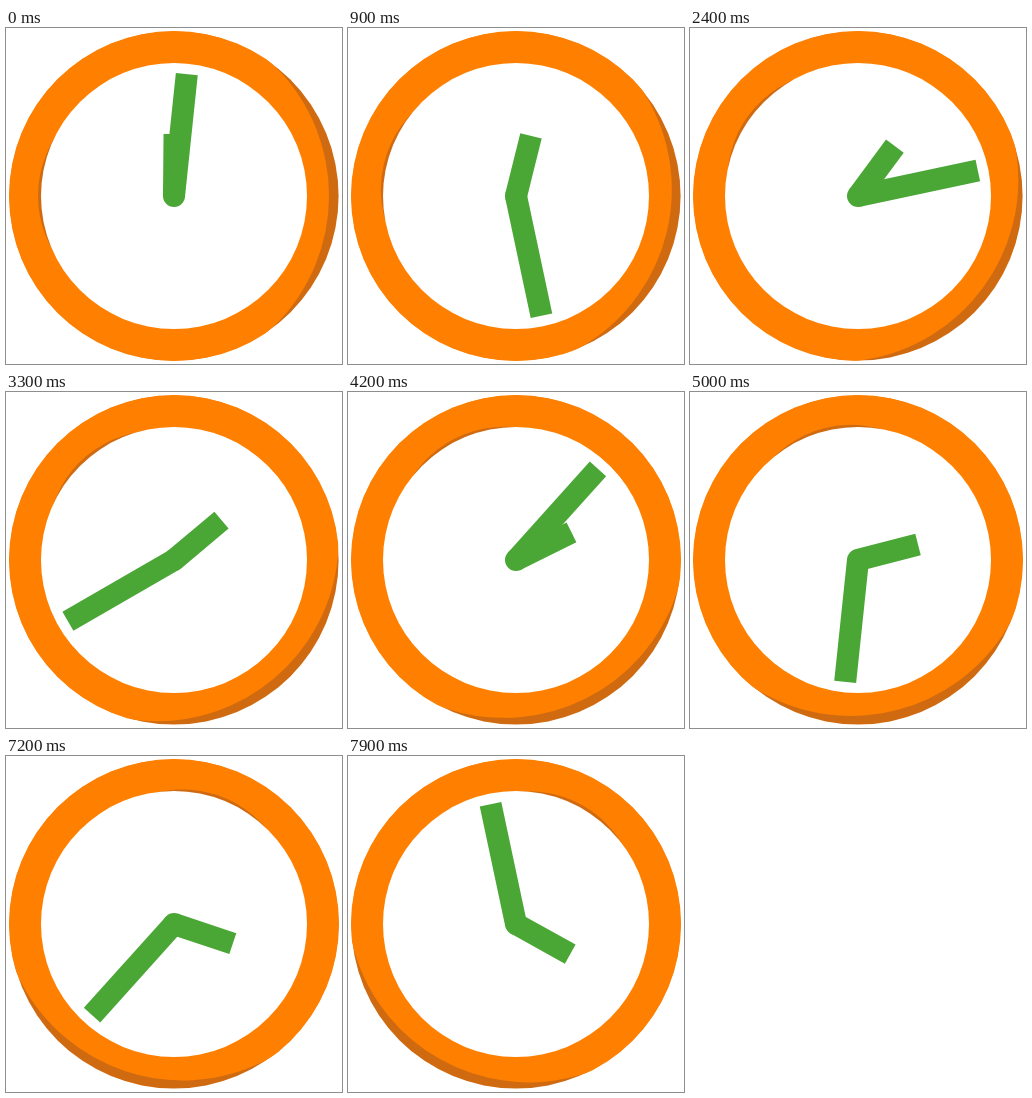
Recreate the animation shown at these times as an HTML page. Size 336 by 336 pixels, loop 8000 ms.

```html
<!DOCTYPE html>
<html lang="en">
<head>
<meta charset="utf-8">
<title>Clock</title>
<style>
  html, body { margin: 0; width: 100%; height: 100%; overflow: hidden; background: #fff; }
  svg { display: block; width: 100%; height: 100%; }
</style>
</head>
<body>
<svg viewBox="-168 -168 336 336">
  <clipPath id="rim"><circle r="165"/></clipPath>
  <circle r="164.6" fill="#d06a10"/>
  <!-- lit front of the ring, shifted away from the shaded side -->
  <g clip-path="url(#rim)">
    <circle id="front" cx="-27" r="145.5" fill="none" stroke="#ff8000" stroke-width="73"/>
  </g>
  <circle r="133" fill="#fff"/>
  <g fill="#4aa635">
    <circle r="11"/>
    <rect id="hour" x="-11" y="-62" width="22" height="62"/>
    <rect id="minute" x="-11" y="-122.5" width="22" height="122.5"/>
  </g>
</svg>
<script>
  const LOOP = 8000, STEP = 100;
  const start = performance.now();
  const turn = (id, deg) =>
    document.getElementById(id).setAttribute('transform', `rotate(${deg})`);

  function draw() {
    const n = Math.floor(((performance.now() - start) % LOOP) / STEP);
    turn('minute', 6 + 18 * n);
    turn('hour', 0.5 + 1.5 * n);
    turn('front', 0.5 + 1.5 * n);
    requestAnimationFrame(draw);
  }
  draw();
</script>
</body>
</html>
```
